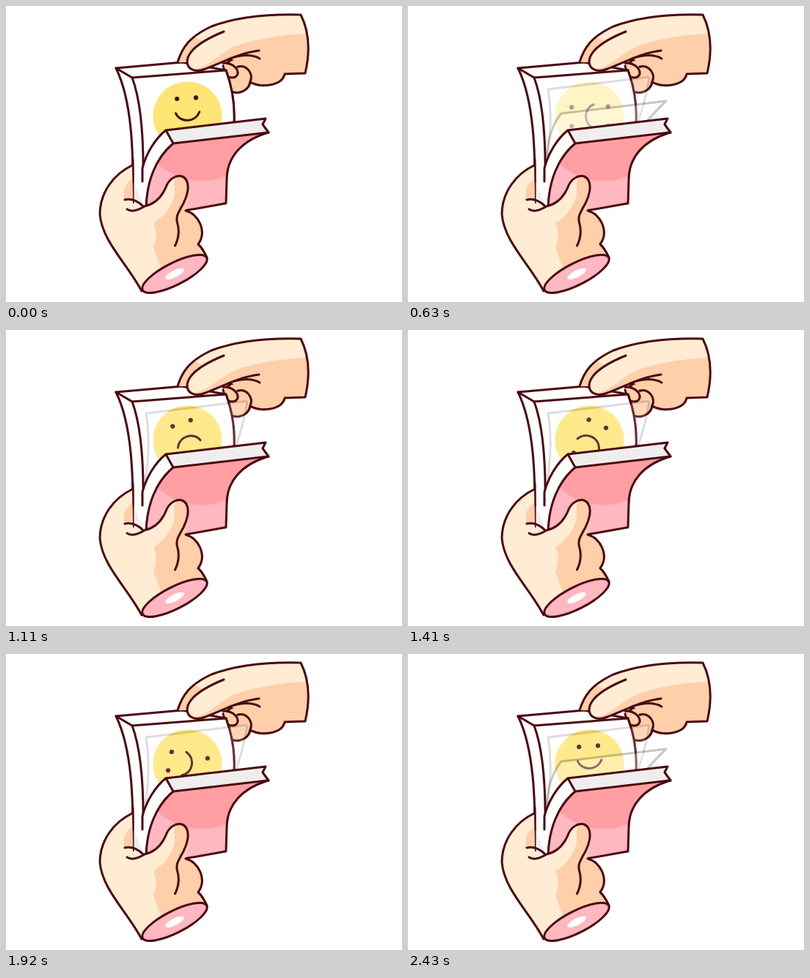
An HTML page without scripts for the animation above (2.46 s loop, 540 by 405 pixels).

```html
<!DOCTYPE html>
<html lang="en">
<head>
<meta charset="utf-8">
<title>Flip book</title>
<style>
  @property --tick { syntax: "<integer>"; inherits: true; initial-value: 0; }
  @property --cycle { syntax: "<integer>"; inherits: true; initial-value: 0; }

  html, body { margin: 0; width: 100%; height: 100%; overflow: hidden; background: #fff; }
  svg {
    display: block; width: 540px; height: 405px;
    fill: none; stroke-linecap: round; stroke-linejoin: round;
    animation: tick 2460ms steps(82) infinite;
  }
  @keyframes tick { from { --tick: 0; } to { --tick: 82; } }

  .line { stroke: #4b0710; stroke-width: 3; }
  .light { fill: #ffecd3; }
  .dark { fill: #fecfa9; }
  .white { fill: #fff; }
  .grey { fill: #efedee; }
  .pink { fill: #ffb7c0; }
  .rose { fill: #ff9fa4; }
  .page { fill: #fff; stroke: #333; stroke-width: 3; }

  /* One page falls every 3.5 ticks; the integer type rounds the cycle down. */
  .flip {
    --cycle: calc((var(--tick) - 1.7) / 3.5);
    --phase: calc(var(--tick) - 3.5 * var(--cycle));
    --start: max(0, 1 - var(--tick));
  }
  .face { opacity: calc(min(1, .5 + var(--phase) + var(--start)) * clamp(0, 5 - 2 * var(--phase), 1)); }
  .turn { transform: translate(248px, 151px) rotate(calc(var(--tick) * 360deg / 81)); }
  .high { opacity: calc(.16 * (1 - var(--start))); }
  .middle { opacity: calc(.23 * clamp(0, 2 * var(--phase) - 4, 1)); }
  .low { opacity: calc(.27 * (clamp(0, 2 - 2 * var(--phase), 1) - var(--start))); }
</style>
</head>
<body>
<svg viewBox="0 0 540 405">
  <defs>
    <g id="eyes" fill="#4b0710">
      <circle cx="-14.8" cy="-24" r="3.1"/>
      <circle cx="11" cy="-25.6" r="3.1"/>
    </g>
    <clipPath id="sheet"><path d="M172 98L300 88C308 110 312 135 311 158V250H188C188 180 184 130 172 98Z"/></clipPath>
  </defs>

  <!-- curled fingers -->
  <g class="line dark">
    <path d="M308 73L380 93C376 110 347 112 333 104C331 116 317 121 308 117L296 82Z"/>
    <path d="M316 83C328 80 338 92 333 104C330 117 316 121 308 117"/>
    <path d="M296 78C306 77 317 84 316 93C314 98 309 99 303 97"/>
  </g>

  <!-- book block -->
  <g class="line white">
    <path d="M150 85L240 77L300 88C308 110 312 135 311 158L300 240L190 278L173 274C174 200 172 130 150 85Z"/>
    <path d="M172 98L300 88C308 110 312 135 311 158L187 240C188 180 184 130 172 98Z"/>
    <path d="M150 85L172 98"/>
  </g>

  <g class="flip">
    <g clip-path="url(#sheet)">
      <g class="face">
        <circle cx="247.5" cy="150.5" r="47" fill="#ffe574"/>
        <g class="turn">
          <use href="#eyes"/>
          <use href="#eyes" transform="rotate(180)"/>
          <path class="line" d="M-16.5 -4.3C-11 9 10 9 15.8 -6.2"/>
        </g>
      </g>
    </g>
    <path class="page high" d="M191 114L329 97C326 120 319 142 314 159L220 172C202 184 192 202 189 211C195 177 196 145 191 114Z"/>
    <path class="page middle" d="M209 127L343 114C331 132 323 145 318 159L220 172C202 184 193 202 189 210C191 180 197 150 209 127Z"/>
    <path class="page low" d="M209 147L352 130C343 139 334 147 326 158L220 172C202 184 193 202 189 210C190 185 195 165 209 147Z"/>
  </g>

  <!-- upper hand -->
  <path class="light" d="M234 77C240 57 250 42 280 28C320 13 365 11 402 12C413 34 415 62 408 92L380 93L350 74C336 60 312 69 290 77L272 86C260 91 248 88 247 76Z"/>
  <path class="dark" d="M234 77C239 62 247 51 258 43L268 48C255 58 248 66 247 77ZM411 38C375 39 335 46 313 55C288 66 283 80 254 87C262 90 278 84 290 79L308 72L335 104C350 111 377 109 380 93L408 92C412 72 413 55 411 38Z"/>
  <path class="dark" d="M316 83C328 80 338 92 333 104L340 106L346 71L308 72Z"/>
  <g class="line">
    <path d="M234 77C240 57 250 42 280 28C320 13 365 11 402 12C413 34 415 62 408 92L380 93C376 110 347 112 333 104"/>
    <path d="M297 35C275 44 248 58 247 76C247 88 260 91 272 86C292 79 318 64 345 61"/>
    <path d="M303 73C319 66 336 66 346 72M316 83C328 80 338 92 333 104"/>
  </g>

  <!-- front cover -->
  <path class="white" d="M218 170C203 182 191 202 186 222L174 266L190 278L228 188Z"/>
  <path class="grey" d="M174 241L190 277L174 270Z"/>
  <path class="pink" d="M228 188L358 173C321 184 301 207 301 238L300 270L240 281L190 281C192 240 205 214 228 188Z"/>
  <path class="rose" d="M228 188L358 173C325 183 305 203 302 231C278 245 234 243 205 214C211 205 218 198 228 188Z"/>
  <g class="line">
    <path d="M218 170C203 182 191 202 186 222V240M173 210V270"/>
    <path d="M191 276C192 240 204 208 228 188M358 173C321 184 301 207 301 238L300 270L238 281"/>
    <path class="grey" d="M218 170L354 154L350 162L358 173L228 188Z"/>
  </g>

  <!-- lower hand -->
  <path class="light" d="M172 218C147 230 128 255 128 285C131 322 165 352 185 390L274 344C271 338 268 331 262 326C275 308 262 284 244 280C249 263 252 241 240 233C231 230 222 238 218 248C212 262 202 272 188 275L173 270Z"/>
  <path class="dark" d="M244 280C262 284 275 308 262 326C268 331 271 338 274 344L212 360L201 330C206 320 206 308 201 297C216 289 229 270 230 256C230 247 228 240 233 233C253 231 249 262 244 280Z"/>
  <path class="dark" d="M172 236C160 246 158 257 163 265C171 263 175 265 180 269L173 264Z"/>
  <g class="line">
    <path d="M172 218C147 230 128 255 128 285C131 322 165 352 185 390"/>
    <path d="M162 265C172 263 180 267 187 274M165 278C172 283 181 279 189 274C203 271 212 262 218 248C222 237 231 231 240 233C252 238 249 256 242 270C234 284 231 289 234 298C237 310 235 319 230.500 328"/>
    <path d="M245 280C262 284 275 308 262 326C268 331 271 338 274 344"/>
  </g>
  <g transform="translate(230 366.500) rotate(-27)">
    <ellipse class="line pink" rx="49" ry="15"/>
    <ellipse class="white" rx="14" ry="4.800"/>
  </g>
</svg>
</body>
</html>
```
